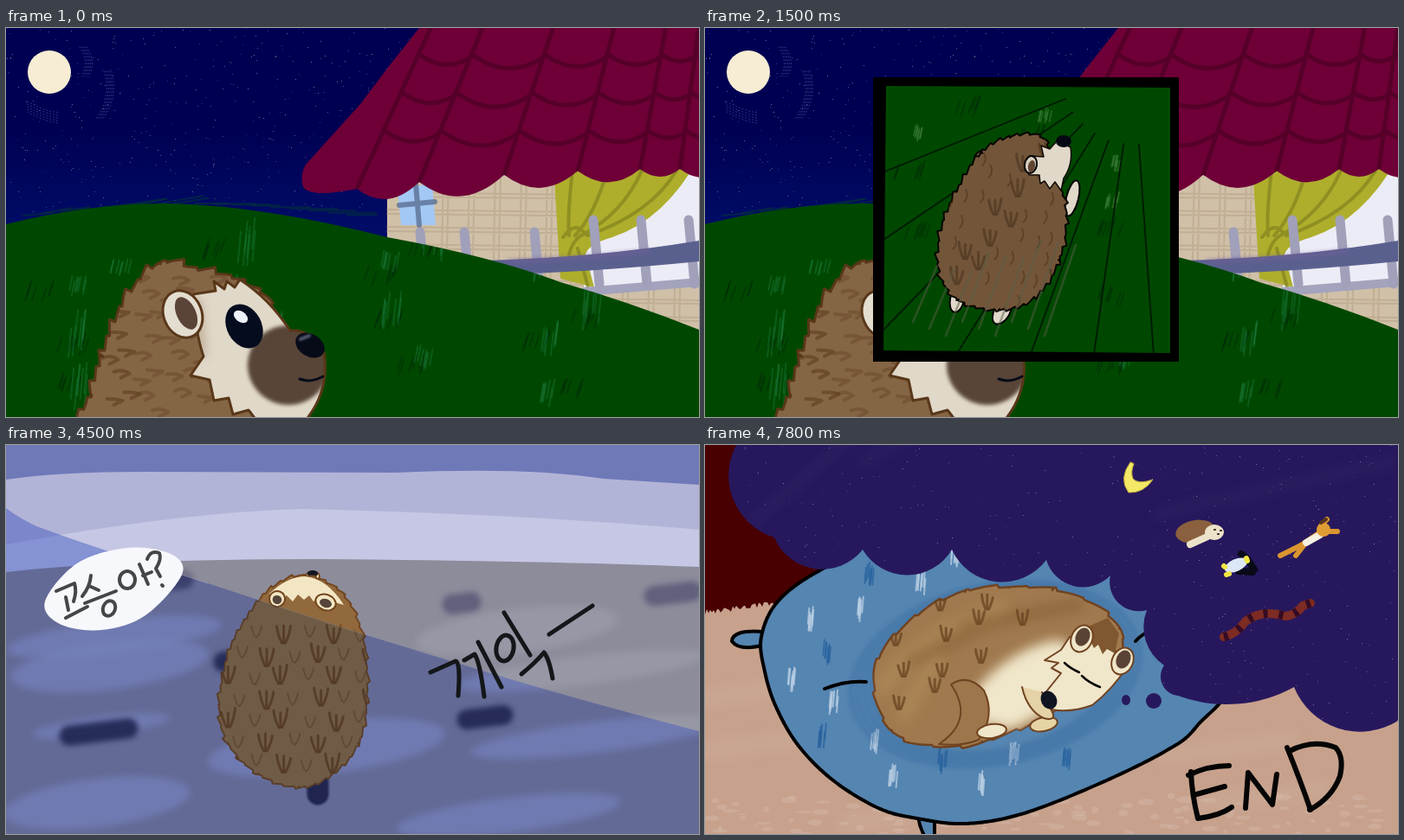
Write an HTML page with a canvas that moves like this. It is 800 by 450 pixels and loops after 9000 ms.

```html
<!DOCTYPE html>
<html lang="ko">
<head>
<meta charset="utf-8">
<title>Hedgehog night</title>
<style>
html, body { margin: 0; width: 100%; height: 100%; overflow: hidden; background: #000 }
canvas { display: block; width: 800px; height: 450px }
</style>
</head>
<body>
<canvas id="stage" width="800" height="450"></canvas>
<script>
const g = document.getElementById('stage').getContext('2d');

let seed;
const rnd = () => (seed = seed * 16807 % 2147483647) / 2147483647;
const path = d => typeof d === 'string' ? new Path2D(d) : d;

function paint(d, fill, line, w = 2, alpha = 1, blur = 0) {
  g.save();
  g.globalAlpha = alpha;
  if (blur) g.filter = `blur(${blur}px)`;
  g.lineCap = g.lineJoin = 'round';
  g.lineWidth = w;
  const p = path(d);
  if (fill) { g.fillStyle = fill; g.fill(p); }
  if (line) { g.strokeStyle = line; g.stroke(p); }
  g.restore();
}

const stroke = (d, color, w, alpha, blur) => paint(d, null, color, w, alpha, blur);

function oval(x, y, rx, ry = rx, deg = 0) {
  const p = new Path2D();
  p.ellipse(x, y, rx, ry, deg * Math.PI / 180, 0, 7);
  return p;
}

function inside(d, draw) {
  g.save();
  g.clip(path(d));
  draw();
  g.restore();
}

// Closed curve through clockwise key points; h > 0 adds a sawtooth of fur.
function smooth(keys, h = 0, step = 14) {
  const pts = keys.split(' ').map(p => p.split(',').map(Number));
  const at = i => pts[(i + pts.length) % pts.length];
  const out = [];
  let walked = 0, last = pts[0];
  for (let i = 0; i < pts.length; i++)
    for (let t = 0; t < 1; t += 1 / 24) {
      const [x, y] = [0, 1].map(k => {
        const [a, b, c, d] = [-1, 0, 1, 2].map(n => at(i + n)[k]);
        return b + t / 2 * (c - a + t * (2 * a - 5 * b + 4 * c - d + t * (3 * b - a - 3 * c + d)));
      });
      const dx = x - last[0], dy = y - last[1], len = Math.hypot(dx, dy) || 1;
      walked += len;
      const tooth = walked / step;
      const s = h * (tooth % 1) * (.7 + .3 * Math.sin(3 * Math.floor(tooth))) / len;
      out.push(`${x + dy * s},${y - dx * s}`);
      last = [x, y];
    }
  return `M${out.join('L')}Z`;
}

// Evenly spread spots with a little jitter.
function scatter(n, x, y, w, h, draw) {
  for (let i = 1; i <= n; i++)
    draw(x + w * ((i * .7549 + .06 * rnd()) % 1), y + h * ((i * .5698 + .06 * rnd()) % 1), i);
}

// Bundle of hairs that meet at the bottom.
function tuft(x, y, size, color, alpha = .7) {
  for (let i = -1; i <= 1; i++)
    stroke(`M${x + i * size * .4},${y - size * (.3 + .3 * rnd())}Q${x + i * size * .35},${y} ${x + i * 2},${y + size * .5}`, color, 3, alpha);
}

function blades(x, y, w, h, color, alpha) {
  for (let i = 0; i < 7; i++)
    stroke(`M${x + w * (rnd() - .5)},${y + h * (.5 - .4 * rnd())}l${w * .15},${-h * .6}`, color, 2, alpha);
}

function stars(n, w, h, color, alpha) {
  g.fillStyle = color;
  for (let i = 0; i < n; i++) {
    g.globalAlpha = alpha * (.3 + .7 * rnd());
    g.fillRect(rnd() * w | 0, rnd() * h | 0, 1, 1);
  }
  g.globalAlpha = 1;
}

function fillAll(color) {
  g.fillStyle = color;
  g.fillRect(0, 0, 800, 450);
}

function nightSky() {
  const s = g.createLinearGradient(0, 0, 0, 230);
  s.addColorStop(.5, '#000052');
  s.addColorStop(1, '#000c66');
  fillAll(s);
  stars(420, 480, 215, '#c0b8c8', .6);
  paint(oval(50, 51, 25), '#f6edd4');
  g.setLineDash([1, 3]);
  for (let i = 0; i < 5; i++)
    stroke(`M${85 + i * 2},22q12,18 2,34M${113 + i * 2},50q10,30 -10,56M25,${85 + i * 3}q16,10 35,13`, '#8c8cc8', 1, .4);
  g.setLineDash([]);
}

function roof() {
  const ridges = [405, 477, 575, 660, 732, 778, 830];
  const eave = x => 163 + (778 - x) ** 2 / 6060;
  const slant = (x, y) => x + (1 - y / eave(x)) * (154 - .17 * x);
  const scallop = (a, b, y, yb) => `Q${(a + b) / 2},${y + (b - a) * .38} ${b},${yb}`;

  let outline = 'M477,0L443,43L409,88L346,158Q339,170 343,184Q352,197 405,186', lines = '';
  ridges.forEach((x, i) => {
    lines += `M${slant(x, 0)},0L${x},${eave(x)}`;
    const next = ridges[i + 1];
    if (!next) return;
    outline += scallop(x, next, eave(x), eave(next));
    for (const y of [30, 74, 118])
      lines += `M${slant(x, y)},${y}` + scallop(slant(x, y), slant(next, y), y, y + 3);
  });
  outline += 'V0Z';
  paint(outline, '#6e0037');
  inside(outline, () => stroke(lines, '#560029', 5));
}

function house() {
  paint('M440,150H800V360H440Z', '#d0c0a8');
  let plaid = '';
  for (let y = 190; y < 350; y += 20) plaid += `M440,${y}l360,5m0,4l-360,-4`;
  for (let x = 505; x < 800; x += 30) plaid += `M${x},170l-4,180m6,0l4,-180`;
  stroke(plaid, '#a99574', 2, .4);

  paint('M452,188L492,179L496,228L456,228Z', '#a4c8f4');
  stroke('M473,180L477,228M454,205L495,201', '#5c7094', 6, .8);

  paint('M640,160H800V296L668,303Z', '#ececf6');
  paint('M633,175L640,150H800Q760,222 700,242Q672,250 669,262L679,300L640,290Z', '#aeae2c');
  let folds = 'M643,242Q658,222 668,238Q655,243 650,262M660,255L672,300';
  for (let i = 0; i < 4; i++) folds += `M${654 + i * 40},165Q${648 + i * 32},215 ${650 + i * 7},240`;
  stroke(folds, '#85851f', 4, .75);

  stroke('M668,305L800,294', '#a3a3bd', 10);
  for (const x of [478, 529, 610, 678, 733, 788])
    stroke(`M${x},${x < 650 ? 236 : 222}l7,74`, '#a0a0ba', 11);
  paint('M550,269Q680,266 800,246V270Q690,281 600,284Z', '#5a608e');
  stroke('M580,270Q680,266 740,258', '#74609a', 5, .6, 2);
  roof();
}

function hill() {
  for (let i = 0; i < 18; i++)
    stroke(`M${20 + i * 22},${217 - 14 * Math.sin(i / 5.5)}l${30 + 26 * rnd()},${-14 * rnd() * (i < 9)}`, '#04303c', 2, .65);
  const ground = 'M0,227Q100,202 190,203Q300,206 440,242Q560,264 640,294Q720,317 800,349V450H0Z';
  paint(ground, '#004800');
  inside(ground, () => {
    scatter(14, 0, 250, 780, 190, (x, y) => blades(x, y, 34, 26, '#002f08', .6));
    scatter(16, 30, 240, 740, 200, (x, y) => blades(x, y, 22, 20 + 40 * rnd(), '#1c7a40', .4));
  });
}

function heroHead() {
  const ink = '#593719', black = '#070b18';
  const coat = smooth('98,470 99,425 112,380 126,340 145,305 178,273 220,280 268,294 305,330 300,470', 8, 19);
  paint(coat, '#846544', ink, 3);
  inside(coat, () => scatter(40, 100, 285, 150, 165, (x, y, i) =>
    stroke(`M${x},${y}q10,${8 * rnd() - 6} 18,2l-10,5`, i % 4 ? '#6a492b' : ink, 4, .5)));

  const brow = 'Q304,313 328,350Q352,348 367,376Q374,420 345,455';
  const face = `M216,308L242,304L240,293L252,302L255,293L264,300L270,291${brow}H290L280,442L262,447L257,428L240,431L235,407L213,402L228,380Q218,350 216,308Z`;
  paint(face, '#e0d8c9');
  inside(face, () => {
    stroke('M219,318L224,375', '#a58b6e', 12, .6, 6);
    paint(oval(326, 390, 47, 46), '#584538', null, 0, 1, 2);
  });
  stroke(face, ink, 3);
  paint(oval(204, 331, 22, 28, -22), '#e3ddd0', ink, 3);
  paint(oval(208, 330, 11, 20, -25), '#5a4437');

  paint(oval(275, 345, 20, 27, -28), '#050c1e');
  paint(oval(271, 334, 9, 6, 35), '#eef2f8');
  paint(oval(351, 367, 18, 13, 32), black);
  stroke('M340,360L350,356', '#687184', 4, .8, 1);
  stroke('M339,406Q352,411 366,403', black, 3);
}

function outside() {
  nightSky();
  house();
  hill();
  heroHead();
}

function inset() {
  outside();
  paint('M194,57H547V386H194Z', '#000');
  const pane = 'M209,67L537,69V376L206,373Z', cream = '#e0d8c9';
  paint(pane, '#004800');
  inside(pane, () => {
    scatter(8, 215, 85, 310, 250, (x, y) => blades(x, y, 34, 26, '#002f08', .6));
    scatter(5, 230, 75, 300, 140, (x, y) => blades(x, y, 16, 20, '#478642', .45));
    // Field lines meet at a point on the horizon.
    for (let deg = 86; deg < 160; deg += 12) {
      const c = Math.cos(deg * Math.PI / 180), s = Math.sin(deg * Math.PI / 180);
      stroke(`M${495 + 85 * c},${50 + 85 * s}L${495 + 480 * c},${50 + 480 * s}`, '#001d04', 2);
    }
    paint(oval(424, 197, 7, 21, 14), cream, '#000');
    paint(oval(291, 314, 8, 15, 12), cream, '#000');
    paint(oval(343, 328, 9, 16, 30), cream, '#000');
    paint(oval(318, 151, 7, 9, 25), '#73563b', '#000');
    const coat = smooth('352,127 389,128 404,170 416,215 408,268 380,311 340,325 293,314 271,280 274,232 293,186 320,145', 5, 12);
    paint(coat, '#735639', '#080401');
    inside(coat, () => scatter(34, 280, 140, 130, 170, (x, y, i) =>
      i % 3 ? stroke(`M${x},${y}q4,8 -2,14`, '#543a22', 2, .7) : tuft(x, y, 18, '#4c351f', .65)));
    paint('M388,136L398,140L407,130L422,138Q425,158 414,174L411,188L404,178L398,186L392,177L387,180L386,170L374,170Q368,156 376,148L391,149Z', cream, '#120a05', 1.5);
    paint(oval(376, 158, 7, 10, 10), '#d8cec0', '#000');
    paint(oval(377, 160, 4, 7, 10), '#604633');
    paint(oval(414, 131, 9, 7), '#050812');
    for (let i = 0; i < 9; i++)
      stroke(`M${240 + i * 19},${340 + i % 3 * 8}l${28 + i},${-65 - i * 5}`, '#595c48', 2.5, .5);
  });
}

const dusk = {
  sky: '#5564b0', far: '#7b86cb', near: '#8592d3', ground: '#636a96', patch: '#7480bb',
  dark: '#202550', fur: '#705c46', tuft: '#4d331f', face: '#aaaab2', ink: '#593e29'
};
const lit = {
  sky: '#6f79b8', far: '#b2b4d7', near: '#c6c7e4', ground: '#8c8c9b', patch: '#9b9ca8',
  dark: '#5c5c7a', fur: '#91693d', tuft: '#704817', face: '#f3e6c4', ink: '#72451d'
};

function yard(c) {
  fillAll(c.sky);
  paint('M0,40Q60,31 160,31L450,32Q600,25 690,39L800,46V160H0Z', c.far);
  paint('M0,115Q200,78 340,74Q600,80 800,98V160H0Z', c.near);
  paint('M0,147Q130,132 360,132Q620,134 800,141V450H0Z', c.ground);
  const smears = [[125, 222, 125, 20], [120, 255, 115, 28], [110, 325, 80, 11], [370, 350, 138, 30], [105, 414, 108, 28], [580, 428, 130, 20], [590, 215, 118, 26], [665, 261, 145, 17], [680, 338, 145, 18]];
  for (const [x, y, rx, ry] of smears) paint(oval(x, y, rx, ry, -7), c.patch, null, 0, .75, 4);
  const holes = [[158, 161, 47], [107, 332, 34], [526, 183, 11], [770, 172, 22], [259, 250, 8], [553, 315, 21]];
  for (const [x, y, r] of holes)
    stroke(`M${x - r},${y + r / 8}L${x + r},${y - r / 8}`, c.dark, 23, r > 40 ? .6 : .9, 3);
  stroke('M360,389V404', c.dark, 25, 1, 1);
}

function backView(c) {
  seed = 7;
  paint(oval(354, 152, 8, 6), c.face, c.ink);
  paint(oval(354, 149, 6, 4), '#111723');
  const coat = smooth('346,152 388,173 411,222 416,290 406,345 375,381 338,395 292,380 257,345 247,300 258,240 279,200 308,165', 4, 13);
  paint(coat, c.fur, c.ink);
  paint('M304,172Q325,152 346,152Q371,155 390,185L376,181L362,175L355,181L350,174L344,179L337,173L331,181L324,174L316,178Z', c.face);
  for (const [x, y, r] of [[313, 178, 9], [369, 182, 12]]) {
    paint(oval(x, y, r, 9, 20), c.face, c.ink);
    paint(oval(x, y + 1, r * .6, 5, 20), '#55443a');
  }
  inside(coat, () => {
    for (let row = 0; row < 7; row++)
      for (let col = 0; col < 6; col++) {
        const x = 256 + col * 30 + row % 2 * 12 + 6 * rnd(), y = 213 + row * 25 + 8 * rnd();
        if ((col + row) % 2) stroke(`M${x - 6},${y - 6}q3,13 6,13q4,-4 6,-13`, c.tuft, 2, .45);
        else tuft(x, y, 20, c.tuft);
      }
  });
}

function porch() {
  yard(dusk);
  backView(dusk);
  paint('M491,307Q540,288 600,285Q660,282 713,288V376L499,382Z', '#f6f7fb');
  // 집 앞
  stroke('M513,310L535,307Q528,328 514,341M527,322L541,333M543,298Q552,313 554,337M545,349L547,371Q556,376 557,367L556,345M547,361L556,358', '#626261', 4);
  stroke(oval(617, 315, 11, 15), '#626261', 4);
  stroke('M636,296L642,333M640,312L654,309M618,344L650,337M630,345L633,358M645,341L646,354M622,360L666,355', '#626261', 4);
}

function doorOpens() {
  yard(dusk);
  backView(dusk);
  inside('M0,0H800V331Q650,292 540,258L400,215L215,154Q100,118 35,94Q14,84 0,73Z', () => {
    yard(lit);
    backView(lit);
  });
  paint(smooth('45,181 82,137 140,119 190,126 203,150 161,197 110,214 62,207'), '#f7f8fc');
  // 고슴아?
  const pen = '#454747', marker = '#141719';
  stroke('M58,169L79,160Q82,169 78,181M69,176L72,191M69,200L94,187M98,151Q97,164 88,175M96,163L107,168M91,183L127,169M154,138L164,161M158,151L168,147M163,132Q167,121 177,125Q180,132 173,143L178,152M180,162L181,163', pen, 4);
  stroke(oval(119, 189, 7, 9, 20), pen, 4);
  stroke(oval(140, 156, 9, 10), pen, 4);
  // 끼익
  stroke('M490,263L519,250Q525,251 522,290M529,249L541,242Q547,251 552,291M545,228L572,280M575,194L605,243M595,265Q611,252 621,240Q627,247 631,270M627,219L677,186', marker, 5);
  stroke(oval(576, 235, 10, 15, 10), marker, 5);
}

function sleeper() {
  const ink = '#704321', cream = '#f0e6c9', dark = '#5a4334';
  for (let i = 0; i < 4; i++)
    stroke(oval(335, 265, 145 + i * 8, 88 + i * 5, -12), '#31659d', 6, .3, 2);
  const body = smooth('196,280 206,238 250,194 300,170 350,165 401,168 441,181 478,212 476,248 438,284 391,313 320,343 262,347 216,330', 4, 34);
  paint(body, '#a0794e', ink, 2.5);
  inside(body, () => {
    stroke('M205,280Q240,225 340,190M230,310L265,250', '#b4905d', 22, .5, 7);
    stroke('M300,210L430,185M240,250L330,205', '#80562f', 16, .4, 6);
    stroke('M330,300Q360,262 405,250M350,305L395,280', cream, 48, 1, 7);
    scatter(15, 212, 178, 190, 140, (x, y) => x + y < 590 && tuft(x, y, 16, '#65401f'));
  });
  paint('M284,277Q304,264 322,284Q336,312 316,341Q296,349 270,346Q312,318 284,277Z', '#9d764c', ink);
  paint(oval(331, 331, 17, 8, -8), cream, ink);
  paint(oval(391, 323, 16, 8, -12), '#e7d4a5', ink);
  paint('M366,280Q372,307 391,316Q407,320 400,307L389,286', '#e5d2a7', ink);
  const head = 'M392,249L411,237L421,222L453,220L474,239L487,257Q470,283 447,301Q422,310 400,306L391,289L411,264L400,258L408,252Z';
  paint(head, cream, ink);
  paint('M438,212L465,200L478,218L473,241L464,236L459,242L454,231L449,235Z', '#805731');
  for (const [x, y] of [[435, 224], [482, 250]]) {
    paint(oval(x, y, 12, 16, 25), cream, ink);
    paint(oval(x + 1, y - 2, 8, 11, 25), dark);
  }
  stroke('M415,252Q421,258 432,263M435,267Q443,275 456,280', '#080808', 2.5);
  paint(oval(397, 295, 9, 11, -28), '#101521');
}

function dreamPets() {
  paint('M491,20Q477,39 489,55Q506,56 517,40Q500,46 494,39Q491,31 495,22Z', '#f3e966', '#bfa83c', 1);
  paint(oval(566, 100, 23, 13, -10), '#8a603e');
  stroke('M560,115L580,106', '#ece1c9', 8);
  paint(oval(588, 101, 11, 9), '#ece1c9');
  stroke('M588,98h1M595,99h1M592,103h1', '#30231d', 2);

  stroke('M619,126L626,132L634,144M616,146L632,147', '#080a18', 8);
  paint(oval(613, 139, 14, 7, -24), '#dbe7f4');
  stroke('M599,140l1,1M602,150l3,-1M625,131l1,3', '#f2e643', 6);

  stroke('M664,128L688,116L710,101M682,128L693,114M712,92L718,86M718,100L730,100', '#d9952f', 6);
  stroke('M694,113L710,104', '#f5f0e1', 8);
  paint(oval(714, 98, 8), '#e09c34');
  stroke('M711,90L717,86', '#5a361c', 4);

  const snake = 'M599,222Q613,219 624,204Q642,190 670,198Q682,197 690,186L699,183';
  stroke(snake, '#7d2b23', 10);
  g.setLineDash([5, 13]);
  g.lineWidth = 10;
  g.strokeStyle = '#350b24';
  g.stroke(path(snake));
  g.setLineDash([]);
}

// Scalloped edge; k is the arc radius as a share of the chord.
function cloud() {
  let [x, y] = [36, 0], d = 'M36,0';
  const cusps = [[80, 107, .65], [182, 121], [285, 121], [394, 133], [468, 151], [510, 191], [530, 255, .8], [546, 290], [680, 280, 1.2], [800, 319, .65]];
  for (const [u, v, k = .58] of cusps) {
    const r = k * Math.hypot(u - x, v - y);
    d += `A${r},${r} 0 0 0 ${u},${v}`;
    [x, y] = [u, v];
  }
  d += 'V0Z';
  paint(d, '#27185d');
  inside(d, () => {
    stroke('M185,19L243,-15M525,79L790,20M60,85L170,-10', '#332563', 16, .35, 5);
    stars(430, 800, 320, '#beb4cb', .65);
  });
  paint(oval(518, 296, 9), '#27185d');
  paint(oval(486, 295, 5, 6), '#27185d');
}

function dream() {
  fillAll('#c7a18c');
  scatter(8, 0, 230, 800, 200, (x, y) => stroke(`M${x - 70},${y + 8}l140,-18`, '#d0b2a0', 22, .3, 6));
  scatter(110, 0, 405, 800, 45, (x, y) => paint(oval(x, y, 2 + rnd() * 8, 1 + rnd() * 3), '#dac5b5', null, 0, .3));
  let edge = 'M0,0H150V165';
  for (let x = 150; x >= 0; x -= 2) edge += `L${x},${190 - x * .13 + 7 * rnd()}`;
  paint(edge + 'Z', '#480000');

  const blue = '#5585b1', navy = '#28639f';
  paint('M68,216Q32,213 31,227Q40,239 69,231M246,430Q248,444 255,455H265V435', blue, '#000', 4);
  paint(smooth('65,222 85,180 138,142 250,90 560,90 610,255 568,325 530,355 450,394 365,427 300,438 245,432 200,420 148,388 108,348 82,303 69,262'), blue, '#000', 4);
  for (let i = 0; i < 15; i++) {
    const a = .9 + i * .27, r = i % 2 ? .9 : 1.12;
    const x = 295 + 175 * r * Math.cos(a), y = 260 + 118 * r * Math.sin(a);
    blades(x, y, 10, 30, i % 3 ? '#b9cfe4' : navy, .75);
  }
  sleeper();
  stroke('M138,282Q163,272 186,274M497,227Q504,219 514,215', '#000', 4);
  cloud();
  dreamPets();
  // END
  stroke('M561,378Q562,404 569,432M558,382Q580,371 605,371M564,405L600,395M569,432Q594,429 608,419M624,420L627,379L655,416L660,381M672,350Q688,390 699,422M675,354Q702,340 728,350Q738,361 733,383Q724,408 698,422', '#050505', 6);
}

const scenes = [[1500, outside], [3000, inset], [4500, porch], [6000, doorOpens], [9000, dream]];
let shown;

function tick() {
  const t = performance.now() % 9000;
  const scene = scenes.find(([end]) => t < end)[1];
  if (scene !== shown) {
    shown = scene;
    seed = 5;
    scene();
  }
  requestAnimationFrame(tick);
}
tick();
</script>
</body>
</html>
```
